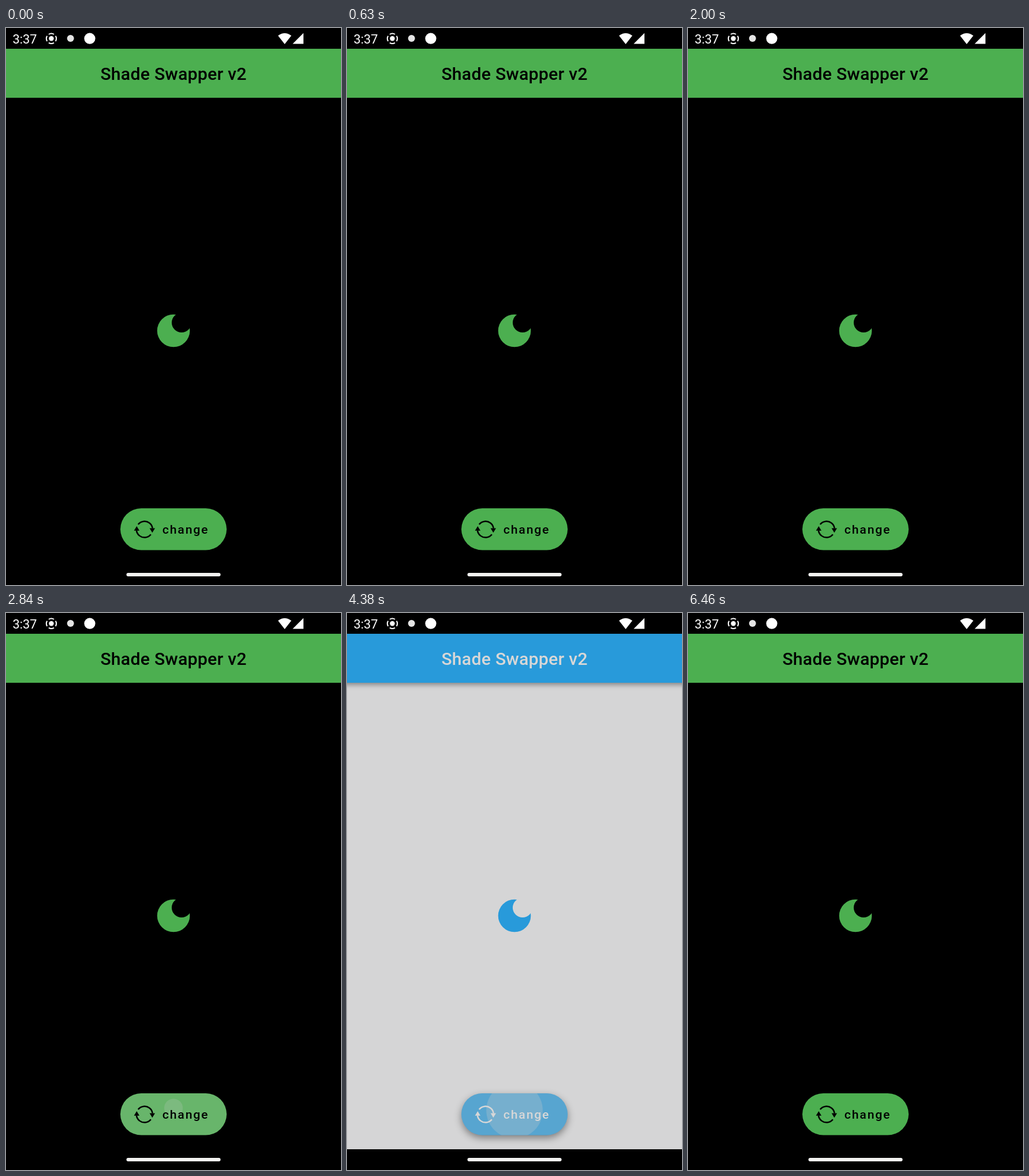
An HTML page with a canvas for the animation above (6500 ms loop, 580 by 966 pixels).

```html
<!DOCTYPE html>
<html lang="en">
<head>
<meta charset="utf-8">
<title>Shade Swapper v2</title>
<style>
  html, body { margin: 0; width: 100%; height: 100%; overflow: hidden; background: #000; }
  canvas { display: block; width: 580px; height: 966px; }
</style>
</head>
<body>
<canvas id="stage" width="580" height="966"></canvas>
<script>
const ctx = document.getElementById('stage').getContext('2d');
const LOOP = 6500;
const TAU = Math.PI * 2;
const FADE = 200;

const DARK = { primary: [76, 175, 80], on: [0, 0, 0], back: [0, 0, 0] };
const LIGHT = { primary: [33, 150, 243], on: [255, 255, 255], back: [252, 252, 253] };

// Each tap: finger down, finger up, ink colours and strength
const TAPS = [
  { down: 2670, up: 2880, glow: '204,204,204', splash: '204,204,204', alpha: 0.25 },
  { down: 4160, up: 4350, glow: '188,188,188', splash: '200,200,200', alpha: 0.4 }
];
const BUTTON = { x: 198, y: 833, w: 184, h: 72.5 };

const clamp = v => Math.max(0, Math.min(1, v));
const mix = (a, b, k) => a + (b - a) * k;
const blend = (key, k) =>
  `rgb(${DARK[key].map((c, i) => Math.round(mix(c, LIGHT[key][i], k))).join(',')})`;

function disc(x, y, r, fill) {
  ctx.fillStyle = fill;
  ctx.beginPath();
  ctx.arc(x, y, r, 0, TAU);
  ctx.fill();
}

function poly(points, fill) {
  ctx.fillStyle = fill;
  ctx.beginPath();
  points.forEach(([x, y]) => ctx.lineTo(x, y));
  ctx.closePath();
  ctx.fill();
}

function pill(x, y, w, h) {
  ctx.beginPath();
  ctx.roundRect(x, y, w, h, h / 2);
}

function arc(x, y, r, from, to) {
  ctx.beginPath();
  ctx.arc(x, y, r, from * TAU / 360, to * TAU / 360);
  ctx.stroke();
}

function label(text, x, y, font, spacing, align, fill) {
  ctx.font = `${font} Roboto, sans-serif`;
  ctx.letterSpacing = spacing + 'px';
  ctx.textAlign = align;
  ctx.fillStyle = fill;
  ctx.fillText(text, x, y);
}

function shadow(offset, blur, alpha) {
  ctx.shadowColor = `rgba(0,0,0,${alpha})`;
  ctx.shadowOffsetY = offset;
  ctx.shadowBlur = blur;
}

function statusBar() {
  const white = '#fff';
  ctx.fillStyle = '#000';
  ctx.fillRect(0, 0, 580, 36);
  label('3:37', 11.5, 26.7, '400 21.8px', 0, 'left', white);

  disc(78.5, 18.3, 4.2, white);
  ctx.strokeStyle = white;
  ctx.lineWidth = 2;
  ctx.lineCap = 'butt';
  for (let a = 0; a < 360; a += 90) arc(78.5, 18.3, 8.6, a - 32, a + 32);

  disc(111.7, 18, 6, '#e4e4e4');
  disc(145, 18.2, 9.6, white);

  ctx.fillStyle = white;
  ctx.beginPath();
  ctx.moveTo(482.5, 28);
  ctx.lineTo(471, 13.2);
  ctx.quadraticCurveTo(482.5, 4.6, 494, 13.2);
  ctx.fill();
  poly([[496.3, 27.6], [515, 8.8], [515, 27.6]], white);
}

function navBar() {
  ctx.fillStyle = '#000';
  ctx.fillRect(0, 930, 580, 36);
  pill(208.5, 945, 163, 6);
  ctx.fillStyle = '#f4f4f2';
  ctx.fill();
}

function moon(fill) {
  ctx.save();
  ctx.beginPath();
  ctx.rect(250, 485, 80, 80);
  ctx.moveTo(321.1, 511);
  ctx.arc(304, 511, 17.1, 0, TAU);
  ctx.clip('evenodd');
  disc(290, 525, 28.3, fill);
  ctx.restore();
}

function sun(fill) {
  disc(290, 525, 15.8, fill);
  ctx.strokeStyle = fill;
  ctx.lineWidth = 6;
  ctx.lineCap = 'round';
  for (let i = 0; i < 8; i++) {
    const a = i * TAU / 8;
    const outer = i % 2 ? 30.4 : 31.6;
    ctx.beginPath();
    ctx.moveTo(290 + 24.8 * Math.cos(a), 525 + 24.8 * Math.sin(a));
    ctx.lineTo(290 + outer * Math.cos(a), 525 + outer * Math.sin(a));
    ctx.stroke();
  }
}

function cycleIcon(fill) {
  ctx.strokeStyle = fill;
  ctx.lineWidth = 2.5;
  ctx.lineCap = 'butt';
  for (const turn of [0, Math.PI]) {
    ctx.save();
    ctx.translate(239.8, 869.6);
    ctx.rotate(turn);
    arc(0, 0, 14, -142, -8);
    poly([[8.8, -2.2], [18.2, -2.2], [13.5, 5.6]], fill);
    ctx.restore();
  }
}

function ink(tap, t) {
  if (t < tap.down || t > tap.up + FADE) return;
  const held = Math.min(t, tap.up) - tap.down;
  const after = Math.max(0, t - tap.up);
  const fade = 1 - after / FADE;
  const { x, y, w, h } = BUTTON;

  ctx.save();
  pill(x, y, w, h);
  ctx.clip();
  ctx.fillStyle = `rgba(${tap.glow},${tap.alpha * clamp(held / FADE) * fade})`;
  ctx.fillRect(x, y, w, h);
  const r = Math.min(104, held * 0.094 + after);
  disc(290, mix(856.5, 869.3, r / 104), r, `rgba(${tap.splash},${tap.alpha * 0.8 * fade})`);
  ctx.restore();
}

function draw(t) {
  const [toLight, toDark] = TAPS.map(tap => tap.up);
  const k = clamp((t - toLight) / FADE) - clamp((t - toDark) / FADE);
  const primary = blend('primary', k);
  const on = blend('on', k);

  ctx.fillStyle = blend('back', k);
  ctx.fillRect(0, 0, 580, 966);

  if (t >= toLight && t < toDark) sun(primary);
  else moon(primary);

  ctx.save();
  shadow(3, 9, 0.42);
  ctx.fillStyle = primary;
  ctx.fillRect(-20, 36, 620, 85);
  shadow(5, 13, 0.42);
  pill(BUTTON.x, BUTTON.y, BUTTON.w, BUTTON.h);
  ctx.fill();
  ctx.restore();

  TAPS.forEach(tap => ink(tap, t));
  label('Shade Swapper v2', 290, 89.5, '500 30.2px', 0.23, 'center', on);
  cycleIcon(on);
  label('change', 270.8, 877, '500 21.1px', 1.89, 'left', on);

  statusBar();
  navBar();
}

const start = performance.now();
function tick() {
  draw((performance.now() - start) % LOOP);
  requestAnimationFrame(tick);
}
tick();
</script>
</body>
</html>
```
